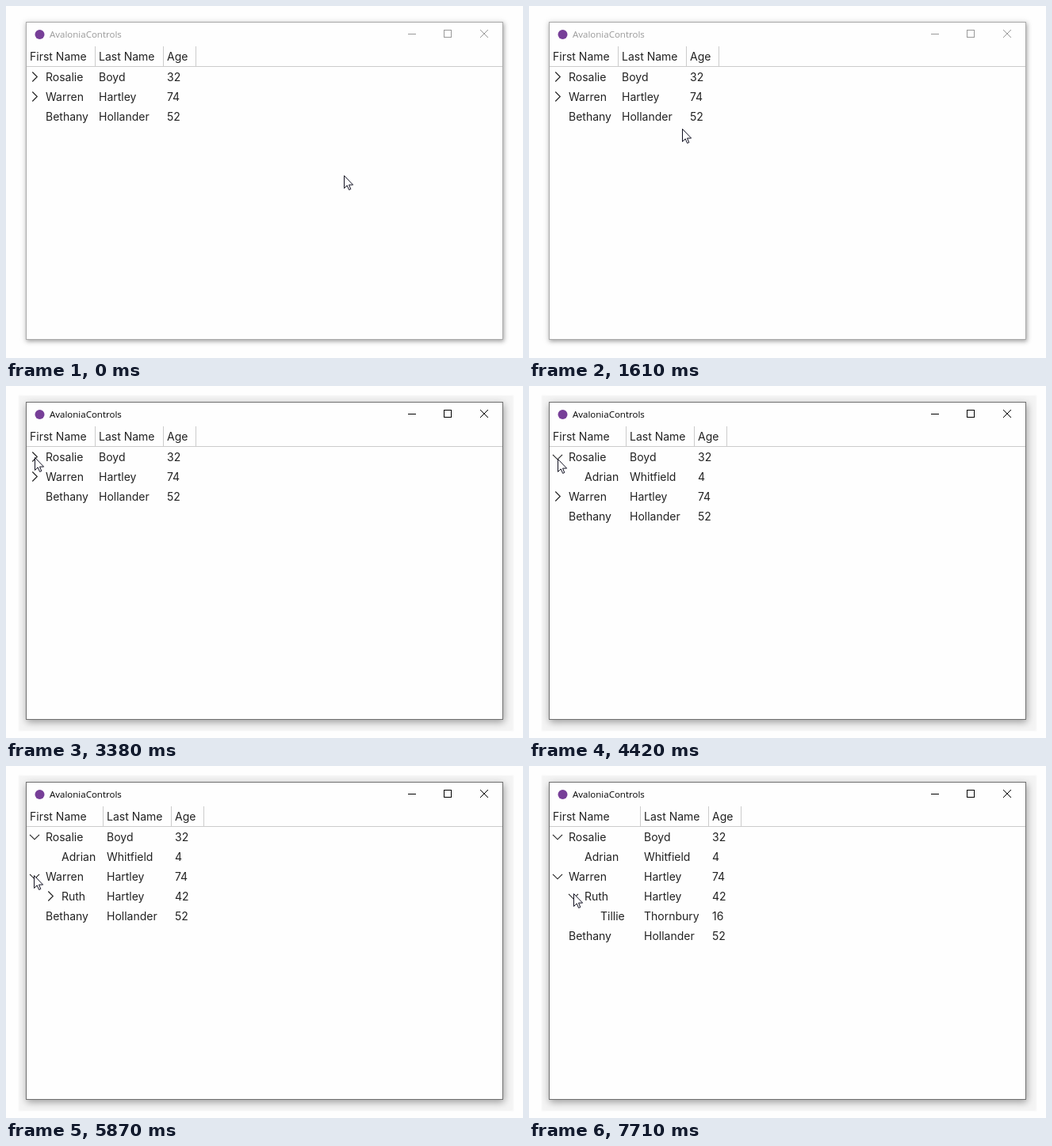
These frames come from a looping animation (652 px wide and 445 px high, 8000 ms). An HTML page:

```html
<!DOCTYPE html>
<html lang="en">
<head>
<meta charset="utf-8">
<title>Tree grid</title>
<style>
  html, body { margin: 0; width: 100%; height: 100%; overflow: hidden; background: #fefefe; }
  #window {
    position: absolute; left: 25px; top: 20px; width: 602px; height: 402px;
    box-sizing: border-box; border: 1px solid #aaa; background: #fefefe;
    box-shadow: 1px 2px 5px rgba(0,0,0,.3), 0 1px 7px 2px rgba(0,0,0,.08);
  }
  #window.active {
    border-color: #707070;
    box-shadow: 1px 3px 9px rgba(0,0,0,.36), 2px 3px 2px 11px #f4f4f4;
  }
  svg { position: absolute; left: 0; top: 0; }
  text { font: 14px Inter, sans-serif; fill: #222; }
  #caption { color: #999; }
  #caption.active { color: #000; }
  #caption text { font: 11.5px "Open Sans", sans-serif; fill: currentColor; }
  .line { fill: none; stroke: #ccc; shape-rendering: crispEdges; }
  .chevron { fill: none; stroke: #222; stroke-width: 1.15; }
</style>
</head>
<body>
<div id="window"></div>
<svg width="652" height="445" viewBox="0 0 652 445">
  <circle cx="42.5" cy="36" r="6" fill="#773f98"/>
  <g id="caption">
    <text x="55" y="40">AvaloniaControls</text>
    <g fill="none" stroke="currentColor">
      <path d="M507 35.5h10M552.5 30.5h9v9h-9z" shape-rendering="crispEdges"/>
      <path d="M598 30l10 10M608 30l-10 10"/>
    </g>
  </g>
  <path class="line" d="M26 76.5H626"/>
  <text x="30" y="69">First Name</text>
  <g id="columns">
    <path class="line" d="M112.5 51V76M198.5 51V76M239.5 51V76"/>
    <text x="117" y="69">Last Name</text>
    <text x="203" y="69">Age</text>
  </g>
  <g id="rows"></g>
  <path id="cursor" d="M.5 .5V16.5L4.2 12.9L6.6 18.4L8.8 17.5L6.5 12.1H11.6Z" fill="#fff" stroke="#111122"/>
</svg>
<script>
const LOOP = 8000, ACTIVATE = 3320;
const OPEN_A = 3430, OPEN_B = 5760, OPEN_C = 7650;

const people = [
  { depth: 0, cells: ['Rosalie', 'Boyd', 32], opens: OPEN_A },
  { depth: 1, cells: ['Adrian', 'Whitfield', 4], shows: OPEN_A },
  { depth: 0, cells: ['Warren', 'Hartley', 74], opens: OPEN_B },
  { depth: 1, cells: ['Ruth', 'Hartley', 42], shows: OPEN_B, opens: OPEN_C },
  { depth: 2, cells: ['Tillie', 'Thornbury', 16], shows: OPEN_C },
  { depth: 0, cells: ['Bethany', 'Hollander', 52] }
];

// Pointer moves: time span, step count, start, bend, end, easing.
const linear = p => p;
const moves = [
  { start: 870, end: 930, steps: 2, from: [426, 214], bend: [423, 216], to: [421, 217], ease: linear },
  { start: 1320, end: 2080, steps: 14, from: [421, 217], bend: [231.5, 175.6], to: [42, 100], ease: p => 1 - (1 - p) ** 1.65 },
  { start: 2140, end: 2380, steps: 5, from: [42, 100], bend: [38, 95], to: [36, 90], ease: linear },
  { start: 4420, end: 5140, steps: 13, from: [36, 90], bend: [40.5, 113], to: [35, 137], ease: p => p ** 1.2 },
  { start: 5640, end: 5640, steps: 1, from: [35, 137], bend: [35, 137], to: [35, 138], ease: linear },
  { start: 6180, end: 6850, steps: 12, from: [35, 138], bend: [45.5, 157.7], to: [56, 160], ease: linear },
  { start: 7100, end: 7100, steps: 1, from: [56, 160], bend: [56, 160], to: [56, 161], ease: linear }
];

const byId = id => document.getElementById(id);
const frame = byId('window'), caption = byId('caption');
const columns = byId('columns'), cursor = byId('cursor');

function add(parent, tag, attrs, content = '') {
  const node = document.createElementNS('http://www.w3.org/2000/svg', tag);
  for (const key in attrs) node.setAttribute(key, attrs[key]);
  node.textContent = content;
  return parent.appendChild(node);
}

const place = (node, x, y, extra = '') =>
  node.setAttribute('transform', `translate(${x} ${y}) ${extra}`);

for (const person of people) {
  const [first, last, age] = person.cells;
  const indent = person.depth * 20;
  person.row = add(byId('rows'), 'g', {});
  add(person.row, 'text', { x: 50 + indent, y: 95 }, first);
  person.details = add(person.row, 'g', {});
  add(person.details, 'text', { x: 117, y: 95 }, last);
  add(person.details, 'text', { x: 203, y: 95 }, age);
  if (person.opens)
    person.chevron = add(person.row, 'path', { class: 'chevron', d: 'M-2.7 -6L3.3 0L-2.7 6' });
}

function pointerAt(time) {
  const move = moves.filter(m => time >= m.start).pop();
  if (!move) return moves[0].from;
  const { start, end, steps, from, bend, to, ease } = move;
  const step = time >= end ? steps : 1 + Math.floor((time - start) / (end - start) * (steps - 1) + .3);
  const p = ease(Math.min(step / steps, 1)), q = 1 - p;
  return from.map((v, i) => Math.round(q * q * v + 2 * p * q * bend[i] + p * p * to[i]));
}

function draw(time) {
  const shift = time >= OPEN_C ? 28 : time >= OPEN_A ? 10 : 0;
  const active = time >= ACTIVATE;
  frame.classList.toggle('active', active);
  caption.classList.toggle('active', active);
  place(columns, shift, 0);

  let y = 0;
  for (const person of people) {
    const visible = time >= (person.shows || 0);
    person.row.style.display = visible ? '' : 'none';
    if (!visible) continue;
    place(person.row, 0, y);
    place(person.details, shift, 0);
    if (person.chevron)
      place(person.chevron, 36 + person.depth * 20, 89.5, time >= person.opens ? 'rotate(90)' : '');
    y += 25;
  }
  place(cursor, ...pointerAt(time));
}

const began = performance.now();
function tick() {
  draw((performance.now() - began) % LOOP);
  requestAnimationFrame(tick);
}
tick();
</script>
</body>
</html>
```
